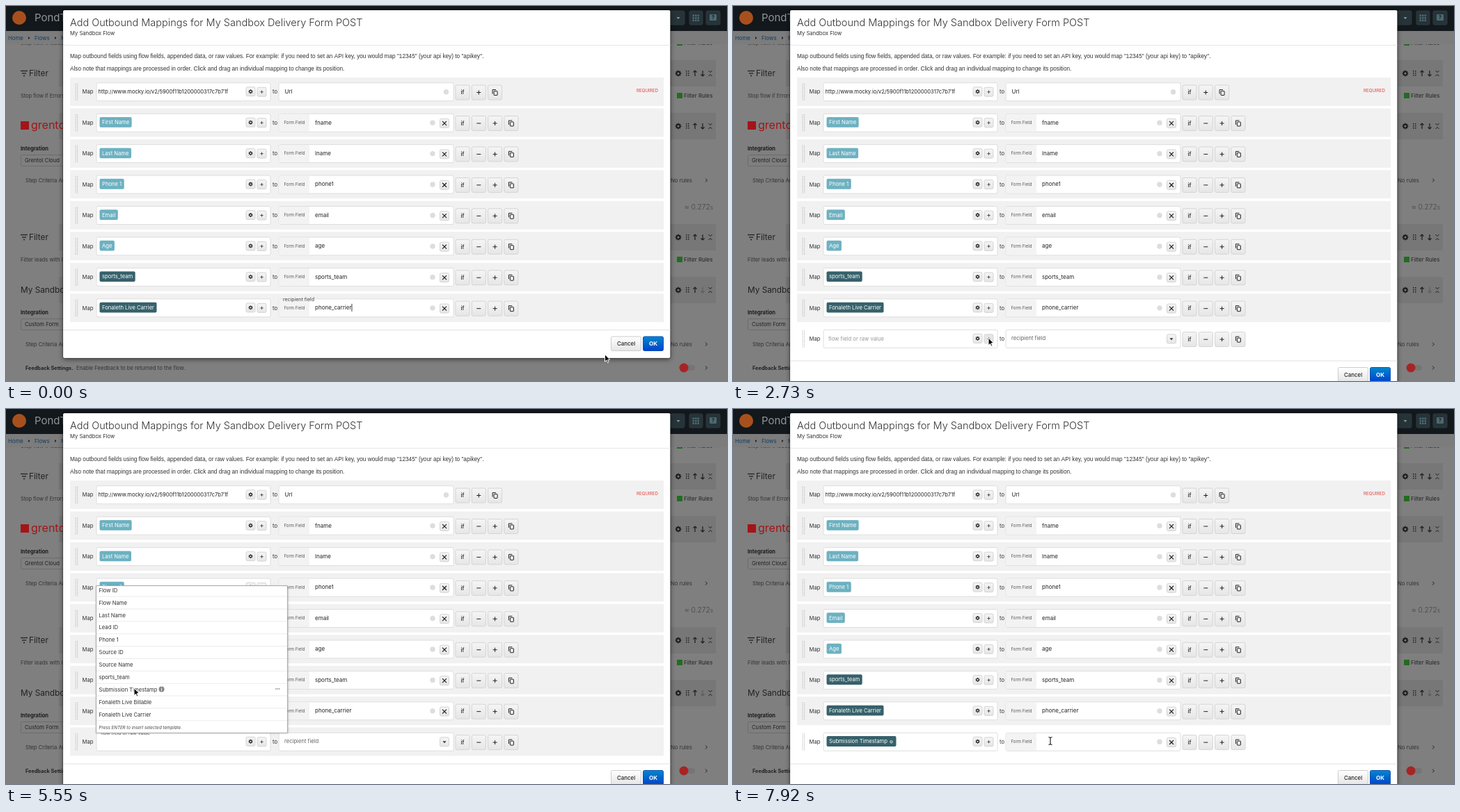
An HTML page with a canvas for the animation above (8 s loop, 1036 px wide and 540 px high).

```html
<!DOCTYPE html>
<html lang="en">
<head>
<meta charset="utf-8">
<title>Outbound mappings</title>
<style>
  html, body { margin: 0; width: 100%; height: 100%; overflow: hidden; background: #7f7f7f; }
  canvas { display: block; width: 1036px; height: 540px; }
</style>
</head>
<body>
<canvas id="stage" width="1036" height="540"></canvas>
<script>
const c = document.getElementById('stage').getContext('2d');
const LOOP = 8000, TICK = 147.7, OFFSET = 70, PITCH = 44.45;
const SANS = 'Inter, sans-serif', ARIAL = '"Liberation Sans", Arial, sans-serif';

const rows = [
  ['http://www.mocky.io/v2/5900f11b1200000317c7b71f', 'Url'],
  ['First Name', 'fname'], ['Last Name', 'lname'], ['Phone 1', 'phone1'],
  ['Email', 'email'], ['Age', 'age'], ['sports_team', 'sports_team'],
  ['Fonaleth Live Carrier', 'phone_carrier'], ['Submission Timestamp', '']
];
const flowFields = ['Age', 'Campaign ID', 'Email', 'First Name', 'Flow ID', 'Flow Name',
  'Last Name', 'Lead ID', 'Phone 1', 'Source ID', 'Source Name', 'sports_team',
  'Submission Timestamp', 'Fonaleth Live Billable', 'Fonaleth Live Carrier'];
const recipientFields = ['Capture', 'Cookie Search Term', 'Default Reason', 'Form Field',
  'Header', 'Outcome On Match', 'Outcome Search Path', 'Outcome Search Term',
  'Reason Path', 'Response Content Type Override', 'Send Ascii'];

// Keys are [tick, ...values]
const pointerKeys = [[2, 860.5, 501.7], [7, 703, 442], [11, 703, 442], [16, 367, 478],
  [20, 367, 478], [23, 244, 397], [28, 244, 397], [32, 184, 402], [38, 184, 402],
  [44, 437, 474], [52, 437, 474], [53, 456, 478]];
const scrollKeys = [[24, 0], [27, 48.5], [30, 74.4]];

function valueAt(keys, n) {
  if (n <= keys[0][0]) return keys[0].slice(1);
  for (let i = 1; i < keys.length; i++) {
    const a = keys[i - 1], b = keys[i];
    if (n > b[0]) continue;
    const u = (n - a[0]) / (b[0] - a[0]), k = u * u * (3 - 2 * u);
    return a.slice(1).map((v, j) => v + (b[j + 1] - v) * k);
  }
  return keys[keys.length - 1].slice(1);
}

// y is the middle of the capitals
function text(s, x, y, size = 7.65, color = '#333', style = '400', family = SANS) {
  c.font = `${style} ${size}px ${family}`;
  c.fillStyle = color;
  c.fillText(s, x, y + size * 0.36);
  return c.measureText(s).width;
}

function rect(x, y, w, h, fill, border, r = 0) {
  c.beginPath();
  c.roundRect(x, y, w, h, r);
  if (fill) { c.fillStyle = fill; c.fill(); }
  if (border) { c.strokeStyle = border; c.lineWidth = 1; c.stroke(); }
}

function disc(x, y, r, color) {
  c.beginPath();
  c.arc(x, y, r, 0, 7);
  c.fillStyle = color;
  c.fill();
}

function path(points, color = '#222', width = 1.2) {
  c.beginPath();
  for (let i = 0; i < points.length; i += 2) c.lineTo(points[i], points[i + 1]);
  c.strokeStyle = color;
  c.lineWidth = width;
  c.stroke();
}

function polygon(x, y, points, fill, border) {
  c.beginPath();
  for (let i = 0; i < points.length; i += 2) c.lineTo(x + points[i], y + points[i + 1]);
  c.closePath();
  c.fillStyle = fill;
  c.fill();
  if (border) { c.strokeStyle = border; c.lineWidth = 1; c.stroke(); }
}

function gradient(y, h, top, bottom) {
  const g = c.createLinearGradient(0, y, 0, y + h);
  g.addColorStop(0, top);
  g.addColorStop(1, bottom);
  return g;
}

const icons = {
  gear(x, y, r = 1.8, color = '#222') {
    c.beginPath();
    c.arc(x, y, r, 0, 7);
    c.strokeStyle = color;
    c.lineWidth = r * 0.75;
    c.stroke();
    for (let i = 0; i < 8; i++) {
      const u = Math.cos(i * Math.PI / 4), v = Math.sin(i * Math.PI / 4);
      path([x + u * r, y + v * r, x + u * r * 1.7, y + v * r * 1.7], color, r * 0.5);
    }
  },
  minus(x, y) { path([x - 3, y, x + 3, y], '#222', 1); },
  plus(x, y, r = 3) {
    path([x - r, y, x + r, y], '#222', r / 3);
    path([x, y - r, x, y + r], '#222', r / 3);
  },
  cross(x, y) {
    path([x - 3, y - 3, x + 3, y + 3]);
    path([x - 3, y + 3, x + 3, y - 3]);
  },
  copy(x, y) {
    path([x - 3.5, y + 2, x - 3.5, y - 4, x + 1.5, y - 4], '#222', 1);
    rect(x - 1.5, y - 2, 5, 6, null, '#222', 0.5);
  },
  if(x, y) { text('if', x - 2.5, y, 7.8, '#222', '500'); },
  caret(x, y) { polygon(x, y, [-2.5, -1, 2.5, -1, 0, 2], '#333'); }
};

function button(icon, x, y, w, h, pointer) {
  const left = x - w / 2, top = y - h / 2, small = w < 15;
  const over = Math.abs(pointer[0] - x) < w / 2 && Math.abs(pointer[1] - y) < h / 2 + 1;
  rect(left, top, w, h, over ? '#e6e6e6' : gradient(top, h, '#f5f5f5', '#e6e6e6'), '#d4d4d4', 2);
  if (small && icon === 'plus') icons.plus(x, y, 2.2);
  else icons[icon](x, y);
}

function toolIcons(y, lastRow) {
  const ink = '#1c1c1c', down = lastRow ? '#5c5c5c' : ink;
  icons.gear(966, y, 2.6, ink);
  for (let i = 0; i < 6; i++) rect(977 + i % 2 * 3, y - 4 + (i >> 1) * 3, 1.5, 1.5, ink);
  for (const [x, s, color] of [[990, -1, ink], [1001, 1, down]]) {
    path([x, y - 4 * s, x, y + 4 * s], color);
    path([x - 2.5, y + 1.5 * s, x, y + 4 * s, x + 2.5, y + 1.5 * s], color);
  }
  for (const s of [-1, 1]) path([1009.5, y + 4 * s, 1012, y + 1.5 * s, 1014.5, y + 4 * s], ink, 1);
}

function chevron(y) { path([1005, y - 2.5, 1007.5, y, 1005, y + 2.5], '#222', 1); }

function filterIcon(y) {
  [5, 3, 1].forEach((w, i) => path([26 - w, y - 3.5 + i * 3.5, 26 + w, y - 3.5 + i * 3.5], '#222', 1.3));
}

function background() {
  rect(0, 0, 1036, 540, '#7f7f7f');
  text('Stop flow if leads', 21, 53, 7.5, '#333');
  rect(964, 49, 8, 8, '#246b22');
  text('Filter Rules', 974, 53, 7.9, '#222');
  rect(0, 36, 1036, 19, '#7c7c7c');
  rect(0, 0, 1036, 36, '#12181b');
  disc(19, 17, 10, '#a8501d');
  text('PondTrellis', 41, 17, 15, '#909699');
  text('Home', 3, 46, 7.8, '#123d63');
  text('Flows', 41, 46, 7.8, '#123d63');
  text('My Sandbox', 79, 46, 7.8, '#123d63');
  for (const x of [33, 71]) polygon(x, 46, [-1, -2, 1.5, 0, -1, 2], '#222');

  for (const [x, w] of [[940, 35], [982, 19], [1006, 20]]) rect(x, 7, w, 20, '#263338', '#2c393e', 2);
  polygon(966, 17, [-2.5, -1, 2.5, -1, 0, 2], '#8a9294');
  for (let i = 0; i < 9; i++) rect(986.5 + i % 3 * 3.5, 12.5 + (i / 3 | 0) * 3.5, 2.5, 2.5, '#4b6a70');
  rect(1011, 12, 10, 9, '#4b6a70', null, 1);
  text('?', 1014, 16.5, 7, '#12181b', '700');

  for (const y of [78, 154, 314, 390]) rect(76, y, 944, 38, '#777');
  for (const y of [97, 333]) {
    filterIcon(y);
    text('Filter', 33, y, 11.8, '#222');
    rect(964, y + 28, 8, 8, '#246b22');
    text('Filter Rules', 974, y + 32, 7.9, '#222');
  }
  text('Stop flow if Errors', 21, 129, 7.4);
  text('Filter leads with low', 21, 365, 7.6);
  rect(21, 166, 12, 12, '#a31517');
  text('grentol', 36, 171, 16, '#a31517');
  text('My Sandbox', 21, 409, 11.8, '#222');
  [97, 173, 333, 409].forEach((y, i) => toolIcons(y, i === 3));
  [[205, 'Grentol Cloud'], [441, 'Custom Form']].forEach(([y, name]) => {
    text('Integration', 21, y, 7.5, '#1c1c1c', '700');
    rect(21.5, y + 9.5, 90, 16, '#7f7f7f', '#6c6c6c', 2);
    text(name, 27, y + 17.5, 7.7, '#222');
    text('Step Criteria Any', 28, y + 46, 7.7);
    text('No rules', 955, y + 46, 7.8);
    chevron(y + 46);
  });
  const w = text('≈ 0.272', 975, 289, 10.2, '#444', '300');
  text('s', 975 + w, 290, 8.5, '#444', '300');
  text('Feedback Settings.', 28, 521, 7.3, '#222', '700');
  text('Enable Feedback to be returned to the flow.', 101, 521, 7.6);
  rect(972, 517, 18, 8, '#757575', null, 4);
  disc(974, 521, 6.5, '#a82424');
  chevron(521);
}

function tag(label, y, dark, withGear) {
  c.font = `400 7.65px ${SANS}`;
  const w = c.measureText(label).width + (withGear ? 16 : 7);
  rect(134.5, y - 8.2, w, 14.8, dark ? '#36616b' : '#6db1c1', null, 2);
  text(label, 138, y - 0.7, 7.65, '#fff');
  if (withGear) icons.gear(134.5 + w - 7, y, 1.5, '#b5cbd0');
}

function caretLine(x, y) { path([x, y - 5.5, x, y + 5.5], '#222', 0.9); }

function mappingRow(i, n, pointer, leftOpen) {
  const top = 103 + PITCH * i, y = top + 20.7, isUrl = i === 0, isNew = i === 8;
  const over = pointer[1] > top && pointer[1] < top + 41 && !(leftOpen && pointer[1] < 467);
  if (!over) rect(92, top, 853, 41, '#f1f1f1');
  for (let k = 0; k < 24; k++) rect(99.5 + k % 2 * 2.5, y - 12 + (k >> 1) * 2.1, 1.2, 1, '#bbb');
  text('Map', 109.5, y);
  text('to', 383, y);
  rect(130, y - 13, 250, 26, '#fff', '#dedede', 2);
  rect(392, y - 13, 251, 26, '#fff', '#dedede', 2);

  const [source, target] = rows[i];
  if (isUrl) text(source, 132.5, y - 0.5, 7.55, '#222');
  else if (!isNew || n >= 39) tag(source, y, i > 5, isNew);
  else if (leftOpen) text('flow field or raw value', 136, y - 12.5, 6.8, '#555');
  else text('flow field or raw value', 137, y, 7.65, '#999');
  button('gear', 351.5, y - 0.5, 13, 13, pointer);
  button('plus', 367.5, y, 13, 13, pointer);

  if (isUrl) {
    text(target, 400.5, y - 0.5, 8, '#222');
    disc(632.5, y, 3.7, '#ddd');
  } else if (isNew && n < 50) {
    text('recipient field', 400, y - 1, 7.65, '#666');
    button('caret', 630, y, 13, 13, pointer);
    if (n >= 45) caretLine(400.5, y - 1);
  } else {
    rect(392.5, y - 12.5, 43.5, 25, '#f3f3f3');
    text('Form Field', 399.5, y - 0.5, 6, '#555');
    const w = text(target, 444, y - 0.5, 8, '#222');
    disc(613, y, 3.7, '#ddd');
    button('cross', 630, y + 0.7, 13, 13, pointer);
    if (i === 7 && n < 9) {
      text('recipient field', 398, y - 12.5, 7, '#444');
      caretLine(444.5 + w, y - 0.5);
    }
    if (isNew && n < 53) caretLine(444.5, y - 0.5);
  }

  const actions = isUrl ? ['if', 'plus', 'copy'] : ['if', 'minus', 'plus', 'copy'];
  actions.forEach((icon, k) => button(icon, 656 + 23.3 * k, y + 0.8, 20, 21, pointer));
  if (isUrl) text('REQUIRED', 906, y - 1.5, 6.2, '#e0413c');
}

function modal(n, pointer, leftOpen) {
  const count = n >= 11 ? 9 : 8, shift = count === 9 ? 44.5 : 0;
  c.save();
  c.shadowColor = 'rgba(0,0,0,.5)';
  c.shadowBlur = 7;
  c.shadowOffsetY = 2;
  rect(82, 6, 872.5, 501 + shift, '#fff', null, 2);
  c.restore();
  rect(81.7, 5.7, 873.1, 501.6 + shift, null, 'rgba(0,0,0,.3)', 2);
  text('Add Outbound Mappings for My Sandbox Delivery Form POST', 92, 23.3, 14.5, '#333', '300');
  text('My Sandbox Flow', 92, 39.5, 7.65);
  rect(82, 56, 872.5, 1, '#e6e6e6');
  text('Map outbound fields using flow fields, appended data, or raw values. For example: if you need to set an API key, you would map "12345" (your api key) to "apikey".',
    92, 72, 8.25, '#333', '400', ARIAL);
  text('Also note that mappings are processed in order. Click and drag an individual mapping to change its position.',
    92, 90, 8.25, '#333', '400', ARIAL);
  for (let i = 0; i < count; i++) mappingRow(i, n, pointer, leftOpen);

  rect(82, 466 + shift, 872.5, 1, '#e2e2e2');
  const top = 476 + shift;
  rect(869.5, top, 43, 20.5, gradient(top, 20, '#fff', '#e6e6e6'), '#ccc', 2);
  text('Cancel', 878, top + 10.3, 7.9, '#222', '500');
  rect(915.5, top, 29, 20.5, gradient(top, 20, '#0088cc', '#0044cc'), '#0a4fb5', 2);
  text('OK', 924, top + 10.3, 8, '#fff', '700');
}

function dropdown(x, items, pitch, scroll) {
  c.save();
  c.shadowColor = 'rgba(0,0,0,.3)';
  c.shadowBlur = 3;
  rect(x, 254.5, 274.5, 212, '#fff');
  c.restore();
  c.save();
  c.beginPath();
  c.rect(x, 255, 274, 197);
  c.clip();
  items.forEach((item, i) => {
    const y = 264 + i * pitch - scroll;
    text(item, x + 3.5, y);
    rect(x, y + 8.5, 274, 1, '#ececec');
  });
  c.restore();
  text('Press ENTER to insert selected template.', x + 3.5, 458.5, 6.2, '#444', 'italic 400');
  rect(x - 0.5, 254.5, 275, 212, null, '#aaa');
}

function cursor(n, [x, y]) {
  if (n >= 43) {
    for (const [color, width] of [['#fff', 2.4], ['#111', 1.1]]) {
      path([x, y - 5, x, y + 5], color, width);
      for (const s of [-1, 1]) path([x - 2.5, y + 5.5 * s, x, y + 4.8 * s, x + 2.5, y + 5.5 * s], color, width);
    }
  } else if (n >= 21 && n <= 32) {
    polygon(x, y, [-1, 0, 1, 0, 1, 4, 5, 5, 6, 7, 5, 12, -1, 12, -4, 7, -3, 6, -1, 8], '#fff', '#111');
    path([x + 1, y + 8, x + 1, y + 10], '#111', 0.7);
    path([x + 3, y + 8, x + 3, y + 10], '#111', 0.7);
  } else {
    polygon(x, y, [0, 0, 0, 10.5, 2.5, 8.3, 4, 12, 5.7, 11.2, 4.2, 7.7, 7.3, 7.5], '#000', '#fff');
  }
}

function draw(now) {
  const n = Math.floor((now % LOOP - OFFSET) / TICK);
  const pointer = valueAt(pointerKeys, n), leftOpen = n >= 20 && n < 39;
  background();
  modal(n, pointer, leftOpen);
  if (leftOpen) {
    const [scroll] = valueAt(scrollKeys, n);
    dropdown(130, flowFields, 17.87, scroll);
    if (n >= 25 && n < 33) rect(397.5, 257 + scroll * 0.26, 5.5, 50, '#808080', null, 2.7);
    if (n >= 33) {
      disc(223.5, 403.5, 4, '#888');
      text('i', 222.7, 403.5, 6, '#fff', '700');
      for (let k = 0; k < 3; k++) disc(388 + k * 2.3, 403, 0.8, '#666');
    }
  }
  if (n >= 46 && n < 50) dropdown(392.5, recipientFields, 18.15, 0);
  cursor(n, pointer);
  requestAnimationFrame(draw);
}
requestAnimationFrame(draw);
</script>
</body>
</html>
```
